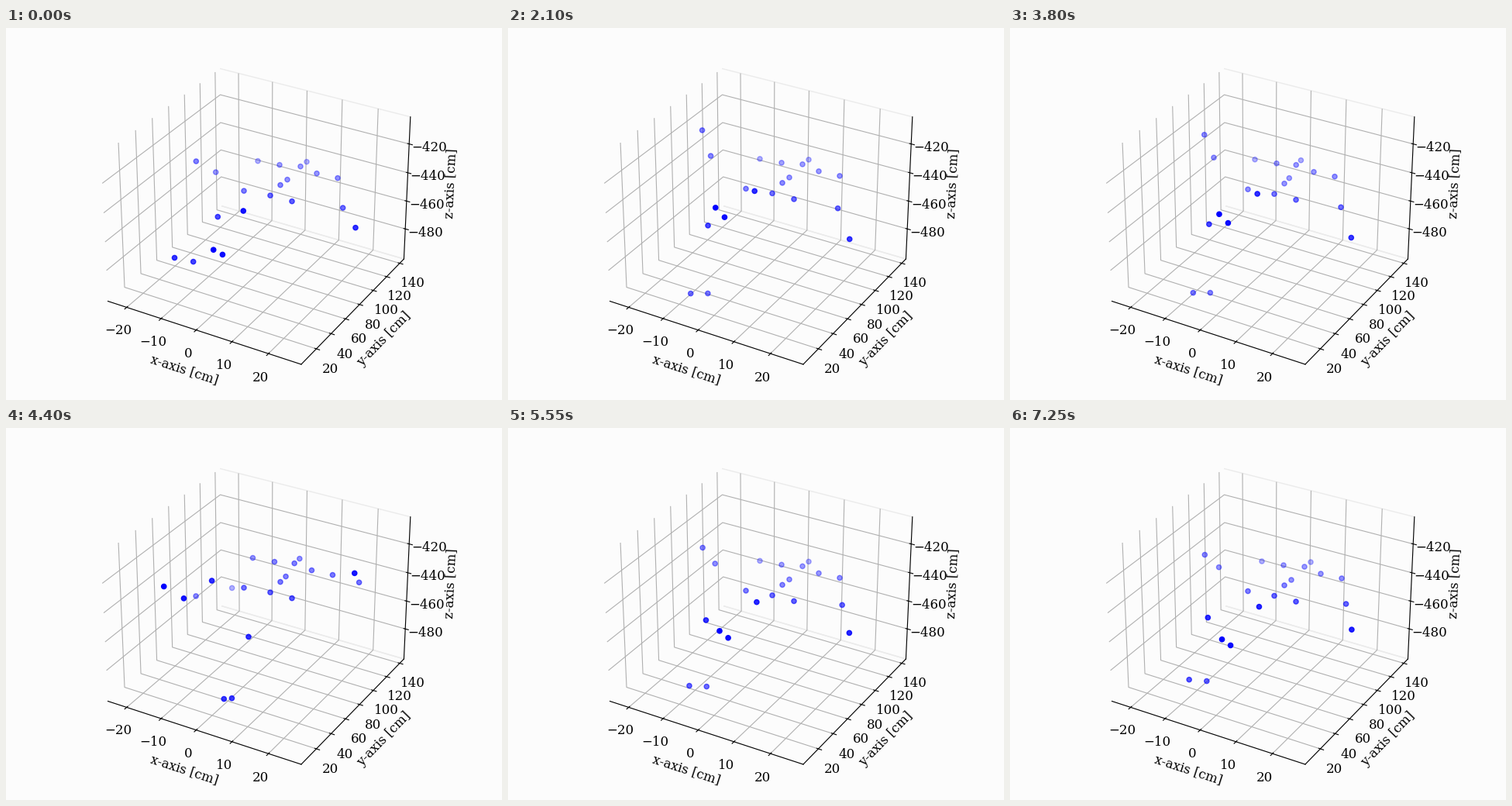
A matplotlib script for the animation above (7.3 s loop, 640x480 px).

```python
import numpy as np
import matplotlib.pyplot as plt
from matplotlib.animation import FuncAnimation

W, H, DPI = 640, 480, 100
FRAMES, STEP = 146, 50
PAPER, FAINT = "#fcfcfc", "#ebebeb"

# Gait: stride length in seconds, moment of the first forward arm swing
STRIDE, START = 1.655, 0.30

# Swings in pixels: weights of cos a, sin a, cos 2a, sin 2a for x and for y
BOB = np.array([[0, 0, 0, 0], [0, 0, -2.5, 0]])
WRIST = np.array([[-16, -1.5, 0, 0], [-20, -1.5, -2.5, -4.5]])
HAND = np.array([[3, 4.5, 0, -1.5], [-45, -5.5, -7, -3]])
KNEE = np.array([[-1.6, -9, 0, -1], [31, 3.5, -3.5, -2]])
FOOT = np.array([[11, 2.6, -2, 6.5], [62, 14, -9.5, 4]])
HALF = np.array([-1, -1, 1, 1])  # half a stride later

joints = []  # rest point, sideways place in the cube, swing, lean


def joint(rest, side, swing=BOB, lean=0):
    joints.append((rest, side, swing, lean))


def pair(left, right, sides, swing=BOB, lean=0, mirror=1):
    """Left and right joint share a swing, half a stride apart."""
    joint(left, sides[0], swing, lean)
    joint(right, sides[1], swing * HALF * [[mirror], [1]], lean)


joint((388, 171), 0, lean=1.4)      # head
joint((380, 177), 0.02, lean=1.2)   # neck
joint((363, 194), 0, lean=0.3)      # chest
joint((354, 201), 0)                # spine
joint((341, 214.5), 0.03)           # pelvis
pair((353, 175), (401, 186), (-0.07, 0.10), lean=1)       # shoulders
pair((325, 170), (428, 192), (-0.19, 0.20), lean=1)       # elbows
pair((276, 188), (440, 220), (-0.30, 0.32), WRIST, mirror=-1)
pair((247, 179), (447, 237), (-0.35, 0.50), HAND)
pair((307, 208.5), (369, 222), (-0.12, 0.14))             # hips
pair((265, 230), (313, 242), (-0.10, 0.10), KNEE)
pair((243, 286), (285, 302), (-0.13, 0.08), 0.95 * FOOT)  # ankles
pair((219, 279), (274, 297), (-0.18, 0.06), 1.07 * FOOT)  # toes

rest, side, swing, lean = (np.array(part, float) for part in zip(*joints))


def pose(t):
    a = 2 * np.pi * (t - START) / STRIDE
    p = rest + swing @ [np.cos(a), np.sin(a), np.cos(2 * a), np.sin(2 * a)]
    p[:, 0] -= 9 * lean * np.exp(-((t - 3.8) / 0.8) ** 4)  # one short stoop
    return p


def nearness(p):
    """Distance towards the viewer for elev 30, azim -60."""
    u, v = (p[:, 0] - 326) / 286, (234 - p[:, 1]) / 286
    y = 2 * u - 1.732 * side
    z = (v + 0.25 * side - 0.433 * y) / 0.866
    return 0.433 * side - 0.75 * y + 0.5 * z


plt.rcParams.update({"font.family": "DejaVu Serif", "font.size": 12})
fig = plt.figure(figsize=(W / DPI, H / DPI), dpi=DPI, facecolor=PAPER)

box = fig.add_axes([0, 18 / H, 1, 444 / H], projection="3d", facecolor=PAPER)
box.set(xlim=(-25.53, 28.82), ylim=(0.05, 146.5), zlim=(-502, -401.5),
        xticks=range(-20, 21, 10), yticks=range(20, 141, 20),
        zticks=range(-480, -419, 20),
        xlabel="x-axis [cm]", ylabel="y-axis [cm]", zlabel="z-axis [cm]")
for axis, edge in ((box.xaxis, PAPER), (box.yaxis, FAINT), (box.zaxis, FAINT)):
    axis.pane.set(alpha=None, fill=False, edgecolor=edge)

stage = fig.add_axes([0, 0, 1, 1])
stage.set(xlim=(0, W), ylim=(H, 0))
stage.axis("off")
dots = stage.scatter(*rest.T, s=20, c="b")


def draw(i):
    p = pose(i * STEP / 1000)
    w = nearness(p)
    order = np.argsort(w)
    rgba = np.zeros((len(p), 4))
    rgba[:, 2] = 1
    rgba[:, 3] = 1 - 0.7 * (w.max() - w) / np.ptp(w)
    dots.set_offsets(p[order])
    dots.set_facecolor(rgba[order])
    dots.set_edgecolor(rgba[order])
    return [dots]


anim = FuncAnimation(fig, draw, frames=FRAMES, interval=STEP, repeat=True, repeat_delay=0)
plt.show()
```
